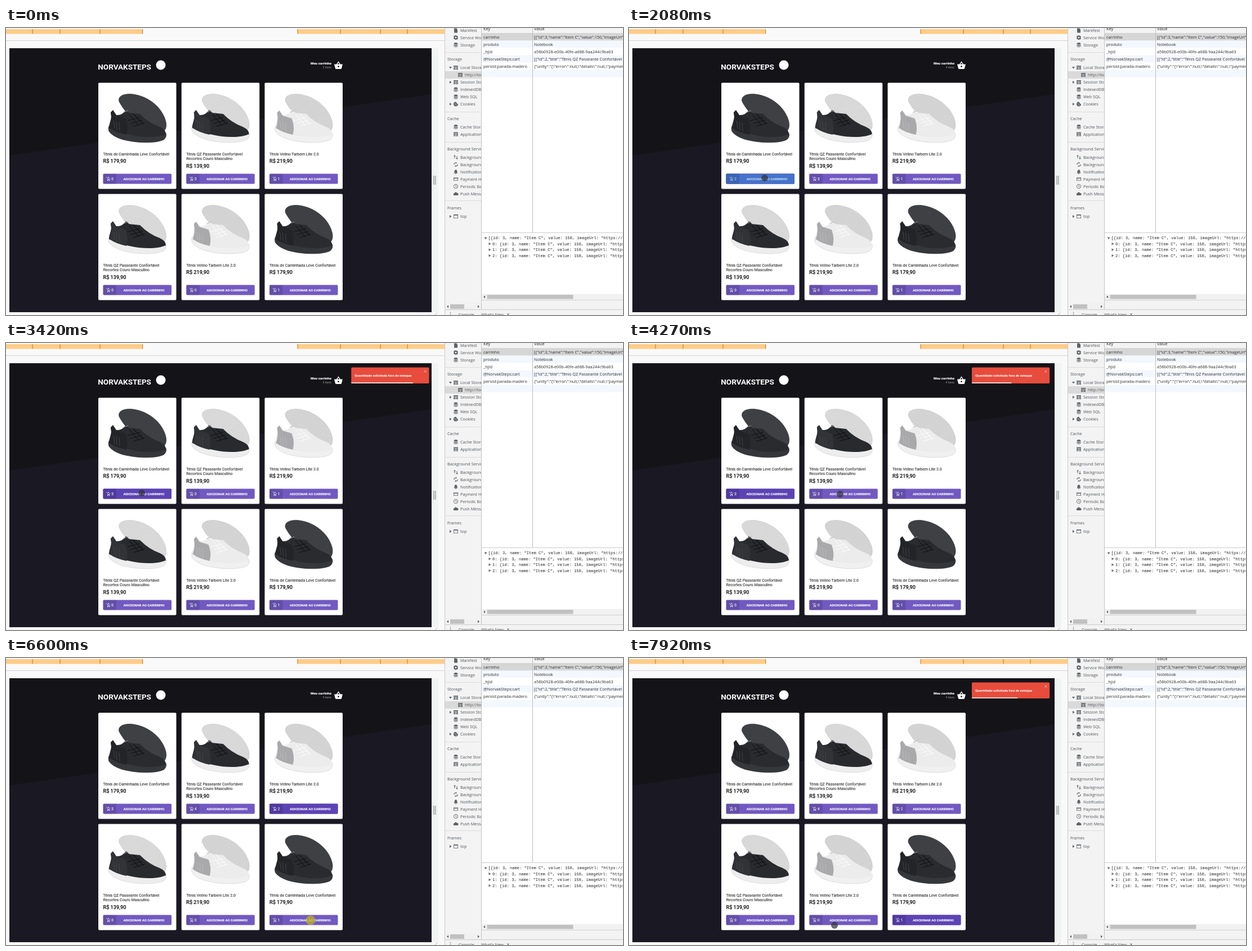
Animation of 1096 by 511 pixels, one loop 8 s. Source, as an HTML page:

```html
<!DOCTYPE html>
<html lang="pt-BR">
<head>
<meta charset="utf-8">
<title>Loja de tênis</title>
<style>
html, body { margin: 0; width: 100%; height: 100%; overflow: hidden; background: #f9f9f9; }
svg { display: block; width: 1096px; height: 511px; }
text { white-space: pre; }
.shop { font-family: Roboto, Arial, sans-serif; }
.tools { font-family: "Open Sans", "Noto Sans", sans-serif; font-size: 7.3px; fill: #50545a; }
.tools .cell { fill: #2b2b2b; }
.tools .code { font: 7.12px "Liberation Mono", "DejaVu Sans Mono", monospace; fill: #222; }
</style>
</head>
<body>
<svg id="stage" viewBox="0 0 1096 511">
  <defs>
    <clipPath id="view"><rect x="6" y="36" width="750" height="470"/></clipPath>
    <pattern id="tread" width="4" height="5" patternUnits="userSpaceOnUse" patternTransform="rotate(36)">
      <path d="M0 1L2 2.500L4 1M0 3.500L2 5L4 3.500" fill="none" stroke="#777" stroke-width=".8"/>
    </pattern>
  </defs>
</svg>
<script>
const LOOP = 8000;
const stage = document.getElementById('stage');

function el(tag, attrs, parent = stage) {
  const node = document.createElementNS('http://www.w3.org/2000/svg', tag);
  for (const key in attrs) node.setAttribute(key, attrs[key]);
  parent.appendChild(node);
  return node;
}
const rect = (x, y, width, height, fill, parent, more) =>
  el('rect', { x, y, width, height, fill, ...more }, parent);
const path = (d, fill, parent, more) => el('path', { d, fill, ...more }, parent);
const line = (d, stroke, parent, width = 1) =>
  path(d, 'none', parent, { stroke, 'stroke-width': width });
function label(x, y, str, parent, more) {
  const node = el('text', { x, y, ...more }, parent);
  node.textContent = str;
  return node;
}

// Browser frame
rect(0, 0, 1096, 511, '#f9f9f9');
function ruler(x, w, ticks) {
  rect(x, 2, w, 8.5, '#fdcc87');
  ticks.forEach(tick => rect(tick, 2, 1.2, 8.5, '#d9821f'));
}
ruler(0, 243, [46.5, 95.5, 166.5, 242]);
ruler(518, 261, [517.5, 593.5, 664.5, 712.5]);
rect(0, 22, 779, 1, '#d2d3d5');
rect(756, 36, 12, 470, '#f2f3f4');
rect(759.5, 263, 1.2, 16, '#8c8c8c');
rect(762.3, 263, 1.2, 16, '#8c8c8c');
line('M762 511L766 507', '#999', stage, .8);

// Shop page
const shop = el('g', { class: 'shop', 'clip-path': 'url(#view)' });
rect(6, 36, 750, 470, '#1a1823', shop);
path('M6 36H756V118L6 227Z', '#141418', shop);
label(163.3, 73.6, 'NORVAKSTEPS', shop, { 'font-size': 13.5, 'font-weight': 700, fill: '#fff' });
el('circle', { cx: 275, cy: 66, r: 8.5, fill: '#fff' }, shop);
label(578, 65.2, 'Meu carrinho', shop, { 'font-size': 6.2, 'font-weight': 700, fill: '#fff', stroke: '#fff', 'stroke-width': .15, 'text-anchor': 'end' });
const itemText = label(578, 72.2, '', shop, { 'font-size': 5.2, fill: '#999', 'text-anchor': 'end' });
path('M583 64.5H587L590.5 59.3L594 64.5H598L596 72Q595.700 73 594.700 73H586.300Q585.300 73 585 72ZM588.600 64.500H592.400L590.500 61.600ZM590.5 67.2a1.4 1.4 0 1 0 .01 0Z',
  '#fff', shop, { 'fill-rule': 'evenodd' });

const SHOES = {
  dark: { back: '#38393d', upper: '#2a2b2e', sole: '#36373b', heel: '#232427', lace: '#131416', edge: '#2c2d31' },
  mixed: { back: '#e6e6e7', upper: '#292a2d', sole: '#ededee', heel: '#323336', lace: '#111214', edge: '#d3d3d4' },
  light: { back: '#e0e0e1', upper: '#ececed', sole: '#f0f0f0', heel: '#a9a9ac', lace: '#fafafa', edge: '#cfcfd1' }
};
function shoe(kind, parent) {
  const c = SHOES[kind];
  const rim = { stroke: c.edge, 'stroke-width': .7 };
  const back = 'M201 131C198 121 210 116 226 118C254 122 278 142 284 167Q286 178 281 183C250 184 216 160 201 131Z';
  path(back, c.back, parent, rim);
  path(back, 'url(#tread)', parent, { opacity: kind === 'dark' ? .35 : .4 });
  path('M183 174C194 184 218 193 250 193Q272 193 284 187Q286 194 280 199C262 207 226 204 205 198Q188 192 183 184Q181 179 183 174Z', c.sole, parent, rim);
  path('M186 150L190 146L196 155Q206 156 213 146L219 151L238 153Q252 168 273 176Q284 181 284 189C266 197 225 197 183 178C183 168 189 162 186 150Z', c.upper, parent);
  path('M186 151L190 147L196 156L212 161Q218 176 214 190Q195 186 184 178Q189 165 186 151Z', c.heel, parent);
  line('M219 154L236 174M226 153L244 171M216 165L238 159M221 170L242 164M226 175L246 169', c.lace, parent, 1.1);
  line('M209 150L217 147', kind === 'light' ? '#b8b8ba' : '#909195', parent, 1.2);
  line('M191 165L193 179M196 166L197 182M201 168L202 184', kind === 'light' ? '#bcbcbe' : '#46474b', parent, .9);
}

const LEVE = { shoe: 'dark', title: ['Tênis de Caminhada Leve Confortável'], price: 'R$ 179,90' };
const COURO = { shoe: 'mixed', title: ['Tênis QZ Passeante Confortável', 'Recortes Couro Masculino'], price: 'R$ 139,90' };
const LITE = { shoe: 'light', title: ['Tênis Velino Tarbem Lite 2.0'], price: 'R$ 219,90' };

function card(item, i) {
  const g = el('g', { transform: `translate(${(i % 3) * 147.75} ${Math.floor(i / 3) * 198})` }, shop);
  rect(164, 97.5, 138.5, 189, '#fff', g, { rx: 1.8 });
  shoe(item.shoe, g);
  item.title.forEach((str, n) => label(172.5, 226.6 + n * 8.8, str, g, { 'font-size': 7, fill: '#333', stroke: '#333', 'stroke-width': .15 }));
  label(172.5, 231 + item.title.length * 8.8, item.price, g, { 'font-size': 9.1, 'font-weight': 500, fill: '#111', stroke: '#111', 'stroke-width': .12 });
  const layer = (fill, width = 121.5) => rect(172.5, 259.5, width, 18, fill, g, { rx: 1.7 });
  layer('#7159c1');
  const dark = layer('#5c43b4');
  const blue = layer('#4672ca');
  layer('rgba(0,0,0,.12)', 23.5);
  const ink = el('g', { fill: '#fff' }, g);
  const cart = el('g', { transform: 'translate(178.2 264.9)' }, ink);
  line('M0 .8H1.200L2.900 4.500H5.600L6.900 2.200M2.900 4.500L2.200 5.700H6.300M4.100 0V2.400M2.900 1.200H5.300', 'currentColor', cart, .65);
  el('circle', { cx: 2.3, cy: 6.8, r: .65 }, cart);
  el('circle', { cx: 5.5, cy: 6.8, r: .65 }, cart);
  const count = label(187.3, 271.1, '', ink, { 'font-size': 6.4, stroke: 'currentColor', 'stroke-width': .12 });
  label(244.9, 270.9, 'ADICIONAR AO CARRINHO', ink, { 'font-size': 6.03, 'font-weight': 700, stroke: 'currentColor', 'stroke-width': .12, 'text-anchor': 'middle' });
  return { dark, blue, ink, count };
}
const cards = [LEVE, COURO, LITE, COURO, LITE, LEVE].map(card);

// Toast
const toast = el('g', {}, shop);
rect(609, 43.5, 138.2, 28.5, '#e74c3c', toast, { rx: 1.7 });
label(615, 60, 'Quantidade solicitada fora de estoque', toast, { 'font-size': 5.95, 'font-weight': 700, fill: '#fff' });
line('M738.3 48.6L742.300 52.600M742.300 48.600L738.300 52.600', '#f8d5d1', toast, .8);
const bar = rect(609, 70, 138.2, 2, 'rgba(255,255,255,.7)', toast);

// Developer tools
const tools = el('g', { class: 'tools' });
rect(779, 0, 317, 511, '#f3f3f3', tools);
rect(779, 0, 1, 511, '#cacaca', tools);
rect(780, 77, 65, 13, '#dadada', tools);
[43, 149, 203, 307].forEach(y => rect(780, y, 65, 1, '#dcdcdc', tools));

const GREY = '#5f6368';
const icons = {
  file: 'M-3 -4H1L3 -2V4H-3Z',
  gear: 'M-1 -4H1V-3L3 -3L4 -1L3 0L4 2L2.500 3.500L1 3V4H-1V3L-3 3L-4 1L-3 0L-4 -2L-2.500 -3.500L-1 -3ZM0 -1.400A1.400 1.400 0 1 0 .01 -1.400Z',
  db: 'M-3.500 -2.600Q0 -5.200 3.500 -2.600V-1.500Q0 .300 -3.500 -1.500ZM-3.500 -.5Q0 1.200 3.500 -.5V1.200Q0 2.800 -3.500 1.200ZM-3.500 2Q0 3.800 3.500 2V3Q0 5 -3.500 3Z',
  grid: 'M-4 -3.500H4V-1.700H-4ZM-4 -1H-.4V1H-4ZM.4 -1H4V1H.4ZM-4 1.700H-.4V3.600H-4ZM.4 1.700H4V3.600H.4Z',
  cookie: 'M0 -4A4 4 0 1 0 4 0L2 -1L1 -3ZM-2 -1H-.8V.2H-2ZM0 1H1.200V2.200H0Z',
  swap: 'M-2 -4L0 -1.800H-1.500V2H-2.500V-1.800H-4ZM2 4L0 1.800H1.500V-2H2.500V1.800H4Z',
  bell: 'M-3.500 2.500L-2.500 1V-1Q-2.200 -3 0 -4Q2.200 -3 2.500 -1V1L3.500 2.500ZM-1 3H1V4H-1Z',
  cloud: 'M-2.500 3Q-5 2.500 -4 0Q-3 -1 -2.500 -1Q-1 -4 2 -1.500Q5 -1 4.500 1.500Q4 3 3 3Z',
  card: 'M-4 -3H4V3H-4ZM-3.200 -.5V2.200H3.200V-.5ZM-3.200 -2.200V-1.600H3.200V-2.200Z',
  clock: 'M0 -4A4 4 0 1 0 .01 -4ZM0 -3.200A3.200 3.200 0 1 1 -.01 -3.200ZM-.4 -2.500H.4V0L2 1L1.500 1.600L-.4 .4Z',
  sync: 'M-3.800 0A3.800 3.800 0 0 1 0 -3.500V-4.500L2 -2.800L0 -1.200V-2.400A2.600 2.600 0 0 0 -2.600 0ZM3.800 0A3.800 3.800 0 0 1 0 3.500V4.500L-2 2.800L0 1.200V2.400A2.600 2.600 0 0 0 2.600 0Z',
  frame: 'M-4 -3.500H4V3.500H-4ZM-3.200 -1.800V2.700H3.200V-1.800Z'
};
function entry(y, icon, str, arrow, indent = 0) {
  path(icons[icon], GREY, tools, { transform: `translate(${799 + indent} ${y})`, 'fill-rule': 'evenodd' });
  label(807 + indent, y + 2.7, str, tools);
  if (arrow === 'open') path(`M787 ${y - 1.5}H792L789.5 ${y + 2}Z`, GREY, tools);
  if (arrow === 'shut') path(`M788 ${y - 2.5}V${y + 2.5}L791.5 ${y}Z`, GREY, tools);
}
entry(4.5, 'file', 'Manifest');
entry(17, 'gear', 'Service Workers');
entry(30, 'db', 'Storage');
label(784, 57.7, 'Storage', tools);
entry(70.5, 'grid', 'Local Storage', 'open');
entry(83.5, 'grid', 'http://localhost', '', 8);
entry(96.5, 'grid', 'Session Storage', 'shut');
entry(109.5, 'db', 'IndexedDB');
entry(122.5, 'db', 'Web SQL');
entry(135.5, 'cookie', 'Cookies', 'shut');
label(784, 163.7, 'Cache', tools);
entry(176, 'db', 'Cache Storage');
entry(189, 'grid', 'Application Cache');
label(784, 217.5, 'Background Services', tools);
entry(230, 'swap', 'Background Fetch');
entry(243, 'sync', 'Background Sync');
entry(256, 'bell', 'Notifications');
entry(269, 'card', 'Payment Handler');
entry(282, 'clock', 'Periodic Background');
entry(295, 'cloud', 'Push Messaging');
label(784, 323.3, 'Frames', tools);
entry(335.5, 'frame', 'top', 'shut');

rect(780, 490, 65, 11, '#f1f1f1', tools);
rect(789, 492, 25, 8, '#c1c1c1', tools);
path('M786 493.500V498.500L783 496ZM838 493.500V498.500L841 496Z', '#606060', tools);

// Storage table and preview
rect(844.5, 0, 251.5, 485, '#fff', tools);
rect(845, 0, 251, 9, '#f3f3f3', tools);
rect(845, 9, 251, .8, '#cacaca', tools);
label(848, 4.4, 'Key', tools, { class: 'cell' });
label(938, 4.4, 'Value', tools, { class: 'cell' });
[
  ['carrinho', '[{"id":3,"name":"Item C","value":150,"imageUrl":"https'],
  ['produto', 'Notebook'],
  ['_hjid', 'a58b0928-e00b-40fe-a688-9aa244c9ba63'],
  ['@NorvakSteps:cart', '[{"id":2,"title":"Tênis QZ Passeante Confortável'],
  ['persist:parada-madero', '{"unity":"{\\"error\\":null,\\"details\\":null,\\"payment'],
  ['', '']
].forEach(([key, value], i) => {
  const y = 9.5 + i * 13;
  rect(845, y, 251, 13, i === 0 ? '#d6d6d6' : i % 2 ? '#f3f7fe' : '#fff', tools);
  label(848, y + 9.1, key, tools, { class: 'cell' });
  label(938, y + 9.1, value, tools, { class: 'cell' });
});
rect(844, 0, 1, 501, '#c4c4c4', tools);
rect(935, 0, 1, 364, '#bdbdbd', tools);
rect(845, 364, 251, 1, '#cacaca', tools);

const row = '{id: 3, name: "Item C", value: 150, imageUrl: "https://';
path('M849.500 372.500H854.500L852 376.500Z', '#6e6e6e', tools);
label(856.5, 376.3, '[' + row, tools, { class: 'code' });
for (let i = 0; i < 3; i++) {
  const y = 384.3 + i * 10.5;
  path(`M857.5 ${y - 2.5}V${y + 2.5}L861.5 ${y}Z`, '#6e6e6e', tools);
  label(864, y + 2.3, `${i}: ${row}`, tools, { class: 'code' });
}
rect(845, 473.5, 251, 10.5, '#f1f1f1', tools);
rect(854.500, 475, 153, 7.5, '#c1c1c1', tools);
path('M851 476.300V481.300L848 478.800Z', '#606060', tools);
rect(845, 484, 251, 1, '#d0d0d0', tools);
rect(779, 501, 317, 1, '#cacaca', tools);
[506.5, 509.5].forEach(cy => el('circle', { cx: 789.5, cy, r: .8, fill: GREY }, tools));
label(804, 512.5, 'Console', tools);
label(844, 512.5, "What's New", tools);
line('M890 508L894 512M894 508L890 512', GREY, tools, .9);

const pointer = el('circle', {});

// Timeline
const moves = [
  [510, 872, 494], [1310, 238, 268], [1380, 238, 265], [1530, 241, 267], [3450, 241, 267],
  [3850, 375, 269], [4850, 375, 269], [5350, 521, 271], [5760, 521, 271],
  [6130, 541, 464], [6280, 541, 467], [7350, 541, 467], [7900, 365, 476], [LOOP, 365, 476]
];
const clicks = [[1380, 140], [1700, 100], [2250, 90], [2680, 90], [4350, 100], [5620, 130], [6600, 80]];
const counts = [
  [[0, 0], [1530, 1], [1860, 2], [2440, 3]],
  [[0, 3], [4500, 4]],
  [[0, 1], [5800, 2]],
  [[0, 0]], [[0, 0]], [[0, 1]]
];
const pressed = { 0: [1500, 4400], 1: [4450, 5800], 2: [5800, 6690], 5: [6690, LOOP + 999] };
const toasts = [{ enter: 2900, start: 2800 }, { enter: 6680, start: 6685 }];

const clamp = v => Math.max(0, Math.min(1, v));
const mix = (a, b, p) => a + (b - a) * p;
const smooth = p => p * p * (3 - 2 * p);
const easeOut = p => 1 - (1 - p) ** 3;
const stepAt = (table, t) => table.filter(s => s[0] <= t).pop()[1];

function tween(keys, p, ease) {
  const i = Math.max(1, keys.findIndex(k => k[0] >= p));
  const [a, b] = [keys[i - 1], keys[i]];
  const q = ease(clamp((p - a[0]) / (b[0] - a[0])));
  return a.slice(1).map((v, n) => mix(v, b[n + 1], q));
}

const bounceIn = [[0, 1293], [.6, -10.8], [.75, 4.3], [.9, -2.2], [1, 0]];
const bounceOut = [[0, 0], [.2, -8.6], [1, 862]];

function drawToast(t) {
  const now = toasts.find(s => t >= s.enter && t < s.start + 3700);
  toast.setAttribute('visibility', now ? 'visible' : 'hidden');
  if (!now) return;
  const end = now.start + 3000;
  const [x] = t < end
    ? tween(bounceIn, clamp((t - now.enter) / 700), easeOut)
    : tween(bounceOut, (t - end) / 700, smooth);
  toast.setAttribute('transform', `translate(${x} 0)`);
  bar.setAttribute('width', 138.2 * clamp((end - t) / 3000));
}

function drawCards(t) {
  const selected = t >= 1750 && t < 3300;
  cards.forEach((c, i) => {
    const [on, off] = pressed[i] || [LOOP, LOOP];
    const blue = i === 0 && selected;
    c.dark.setAttribute('opacity', clamp((t - on) / 200) - clamp((t - off) / 200));
    c.blue.setAttribute('visibility', blue ? 'visible' : 'hidden');
    c.blue.setAttribute('fill', t < 2440 ? '#4672ca' : '#4c68c5');
    const ink = blue ? '#b9d8f6' : '#fff';
    c.ink.setAttribute('fill', ink);
    c.ink.setAttribute('color', ink);
    c.count.textContent = stepAt(counts[i], t);
  });
  itemText.textContent = (t < 1530 ? 3 : 4) + ' itens';
}

function drawPointer(t) {
  const [cx, cy] = tween(moves, t, smooth);
  const down = clicks.some(([at, len]) => t >= at && t < at + len);
  pointer.setAttribute('visibility', t < 510 ? 'hidden' : 'visible');
  pointer.setAttribute('cx', cx);
  pointer.setAttribute('cy', cy);
  pointer.setAttribute('r', down ? 8.4 : 6);
  pointer.setAttribute('fill', down ? 'rgba(190,176,40,.75)' : 'rgba(50,50,58,.72)');
}

const begin = performance.now();
function draw() {
  const t = Math.max(0, performance.now() - begin) % LOOP;
  drawCards(t);
  drawToast(t);
  drawPointer(t);
  requestAnimationFrame(draw);
}
draw();
</script>
</body>
</html>
```
